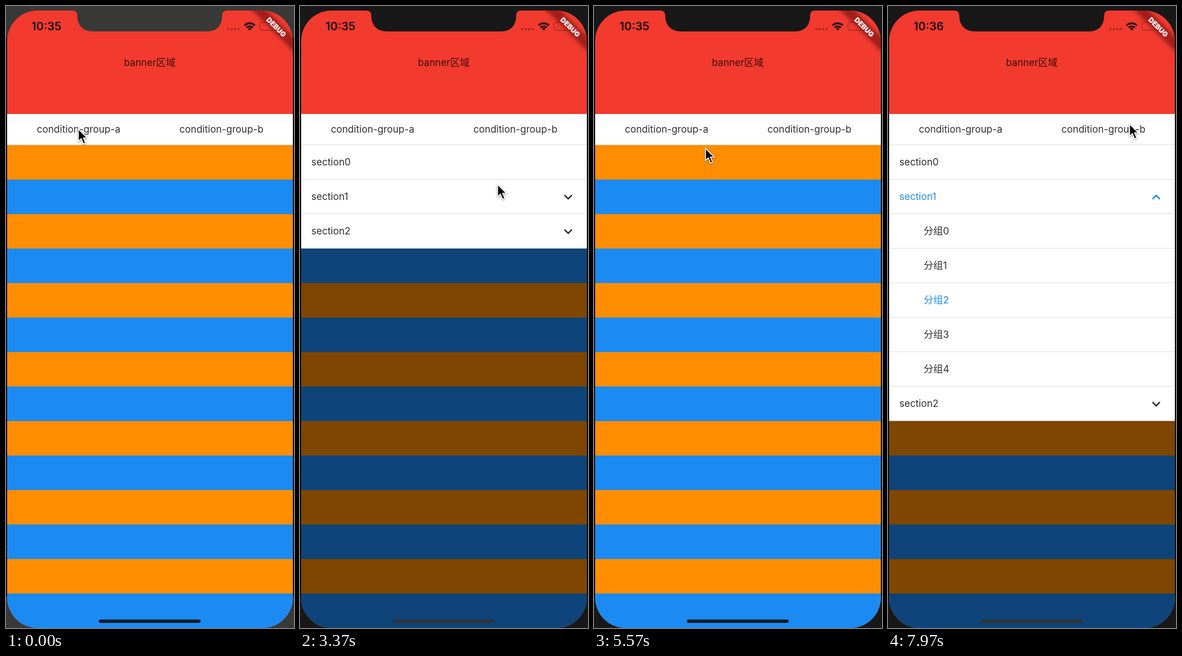
These frames come from a looping animation (509 px wide and 1100 px high, 8000 ms). An HTML page:

```html
<!DOCTYPE html>
<html lang="zh-CN">
<head>
<meta charset="utf-8">
<title>Dropdown menu</title>
<style>
  :root {
    --red: #f33a2f; --orange: #fe8d00; --blue: #1c8af3;
    --ink: #2e2e2e; --pick: #1f8ce8; --line: #dedede;
  }
  * { box-sizing: border-box; }
  html, body { margin: 0; width: 100%; height: 100%; overflow: hidden; }
  body { font: 17.1px Inter, "Noto Sans CJK SC", "Noto Sans CJK", sans-serif; color: var(--ink); }

  /* every animation shares one 8 s clock: 1% = 80 ms */
  .stage, .stage * { animation: 8s linear infinite; }

  .stage { position: relative; width: 509px; height: 1100px; overflow: hidden; background: #181818; animation-name: bezel; animation-timing-function: step-end; }
  .stage::before { content: ""; position: absolute; inset: 56px 0; border: solid #0b0b0b; border-width: 0 2px; }
  .screen { position: absolute; left: 2px; top: 8px; width: 505px; height: 1092px; border-radius: 54px; overflow: hidden; background: var(--red); }
  .page { position: absolute; left: -2px; top: -8px; width: 509px; height: 1100px; }
  .page > * { position: absolute; }

  .stripes { left: 0; top: 246px; width: 509px; height: 854px; background: repeating-linear-gradient(var(--orange) 0 61px, var(--blue) 61px 122px); }
  .home { left: 164px; top: 1085px; width: 180px; height: 6px; border-radius: 3px; background: #191d24; animation-name: home; }
  .mask { left: 0; top: 246px; width: 509px; height: 854px; background: #000; opacity: 0; animation-name: mask; }

  .banner { left: 0; top: 89px; width: 508px; line-height: 22px; text-align: center; color: #3b0f0c; }
  .bar { left: 2px; top: 191px; width: 505px; height: 55px; display: flex; background: #fff; border-bottom: 1px solid var(--line); }
  .bar span { flex: 1; text-align: center; line-height: 54px; }

  .panel { left: 2px; top: 246px; width: 505px; height: 0; overflow: hidden; background: #fff; animation-name: panel; }
  .row { position: relative; height: 61px; padding-left: 18px; line-height: 60px; border-bottom: 1px solid var(--line); }
  .group { height: 0; overflow: hidden; animation-name: group; }
  .group .row { padding-left: 61px; }
  .one { animation-name: one; }
  .two { animation-name: two; animation-timing-function: step-end; }
  .row svg { position: absolute; left: 462px; top: 21px; width: 20px; height: 20px; fill: none; stroke: currentColor; stroke-width: 2.5; }
  .one svg { animation-name: turn; }

  .chrome { left: 0; top: 0; }
  .chrome .old { animation-name: old; animation-timing-function: step-end; }
  .chrome .new { animation-name: new; animation-timing-function: step-end; }
  .clock { font-size: 20px; font-weight: 600; fill: #150403; }
  .notch { fill: #181818; animation-name: notch; animation-timing-function: step-end; }
  .debug { font-size: 12.4px; font-weight: 900; fill: #fff; }

  .cursor { position: absolute; left: 0; top: 0; overflow: visible; filter: drop-shadow(0 1.5px 1.5px #0007); animation-name: cursor !important; animation-timing-function: ease-in-out !important; }

  @keyframes bezel { 0% { background: #393937; } 1.6%, 100% { background: #181818; } }
  @keyframes notch { 0% { fill: #393937; } 1.6%, 100% { fill: #181818; } }
  @keyframes panel {
    0%, 5.5% { height: 0; }
    8%, 26.2% { height: 183px; }
    28.8%, 32.5% { height: 0; }
    35.2%, 46.5% { height: 183px; }
    49%, 61.5% { height: 488px; }
    64%, 73.1% { height: 0; }
    76%, 86.2% { height: 183px; }
    88.7%, 100% { height: 488px; }
  }
  @keyframes mask {
    0%, 5.5%, 28.8%, 32.5%, 64%, 73.1% { opacity: 0; }
    8%, 26.2%, 35.2%, 61.5%, 76%, 100% { opacity: .5; }
  }
  @keyframes home {
    0%, 5.5%, 28.8%, 32.5%, 64%, 73.1% { background: #191d24; }
    8%, 26.2%, 35.2%, 61.5%, 76%, 100% { background: #303236; }
  }
  @keyframes group {
    0%, 46.5% { height: 0; }
    49%, 66% { height: 305px; }
    66.01%, 86.2% { height: 0; }
    88.7%, 100% { height: 305px; }
  }
  @keyframes turn {
    0%, 46.5% { transform: none; }
    49%, 66% { transform: rotate(180deg); }
    66.01%, 86.2% { transform: rotate(0deg); }
    88.7%, 100% { transform: rotate(180deg); }
  }
  @keyframes one { 0%, 46.5% { color: var(--ink); } 48%, 100% { color: var(--pick); } }
  @keyframes two { 0% { color: var(--ink); } 61.2%, 100% { color: var(--pick); } }
  @keyframes old { 0% { opacity: 1; } 73.75%, 100% { opacity: 0; } }
  @keyframes new { 0% { opacity: 0; } 73.75%, 100% { opacity: 1; } }
  @keyframes cursor {
    0%, 7% { transform: translate(127px, 216px); }
    13%, 21.5% { transform: translate(123px, 262px); }
    25.5%, 34.5% { transform: translate(147px, 209px); }
    43.5%, 57.3% { transform: translate(358px, 319px); }
    60.6%, 63.5% { transform: translate(240px, 505px); }
    69.6% { transform: translate(196px, 250px); }
    72%, 75.5% { transform: translate(150px, 218px); }
    80.4% { transform: translate(261px, 228px); }
    84.5%, 88% { transform: translate(350px, 325px); }
    92%, 94.2% { transform: translate(380px, 500px); }
    99.4%, 100% { transform: translate(426px, 207px); }
  }
</style>
</head>
<body>
<div class="stage">
  <div class="screen">
    <div class="page">
      <div class="stripes"></div>
      <div class="mask"></div>
      <div class="home"></div>
      <div class="banner">banner区域</div>
      <div class="bar"><span>condition-group-a</span><span>condition-group-b</span></div>
      <div class="panel">
        <div class="row">section0</div>
        <div class="row one">section1<svg><path d="M3.5 6.5 10 13l6.5-6.5"/></svg></div>
        <div class="group">
          <div class="row">分组0</div>
          <div class="row">分组1</div>
          <div class="row two">分组2</div>
          <div class="row">分组3</div>
          <div class="row">分组4</div>
        </div>
        <div class="row">section2<svg><path d="M3.5 6.5 10 13l6.5-6.5"/></svg></div>
      </div>
      <svg class="chrome" width="509" height="190">
        <path class="notch" d="M117 7v1Q126 8 126 17C126 34 136 45 154 45H355C373 45 382 34 382 17Q382 8 391 8V7Z"/>
        <g class="clock">
          <text class="old" x="45" y="43">10:35</text>
          <text class="new" x="45" y="43">10:36</text>
        </g>
        <g fill="#b32c25">
          <circle cx="393" cy="41" r="2.2"/><circle cx="399" cy="41" r="2.2"/>
          <circle cx="405" cy="41" r="2.2"/><circle cx="411" cy="41" r="2.2"/>
        </g>
        <g fill="none" stroke="#150403" stroke-width="3.2">
          <path d="M421.8 34.3a12.7 12.7 0 0 1 17.8 0M425.2 38.2a8 8 0 0 1 11 0"/>
          <path d="M427.6 40.2a4.5 4.5 0 0 1 6.2 0L430.7 43.4Z" fill="#150403" stroke="none"/>
        </g>
        <rect x="448.7" y="28.7" width="27" height="14" rx="4" fill="none" stroke="#a92a23" stroke-width="1.4"/>
        <g transform="translate(507 8) rotate(45)">
          <rect x="-60" y="34.2" width="120" height="14.6" style="filter:blur(4px)" fill="#0008"/>
          <rect x="-60" y="34.2" width="120" height="14.6" fill="#b71c1ca0"/>
          <text class="debug" x="0" y="46" text-anchor="middle">DEBUG</text>
        </g>
      </svg>
    </div>
  </div>
  <svg class="cursor" width="20" height="30">
    <path d="M.9 1.6V23.4L5.9 18.7 9.8 27.8 13.6 26.2 9.8 17.3H16.4Z" fill="#000" stroke="#fff" stroke-width="1.6"/>
  </svg>
</div>
</body>
</html>
```
